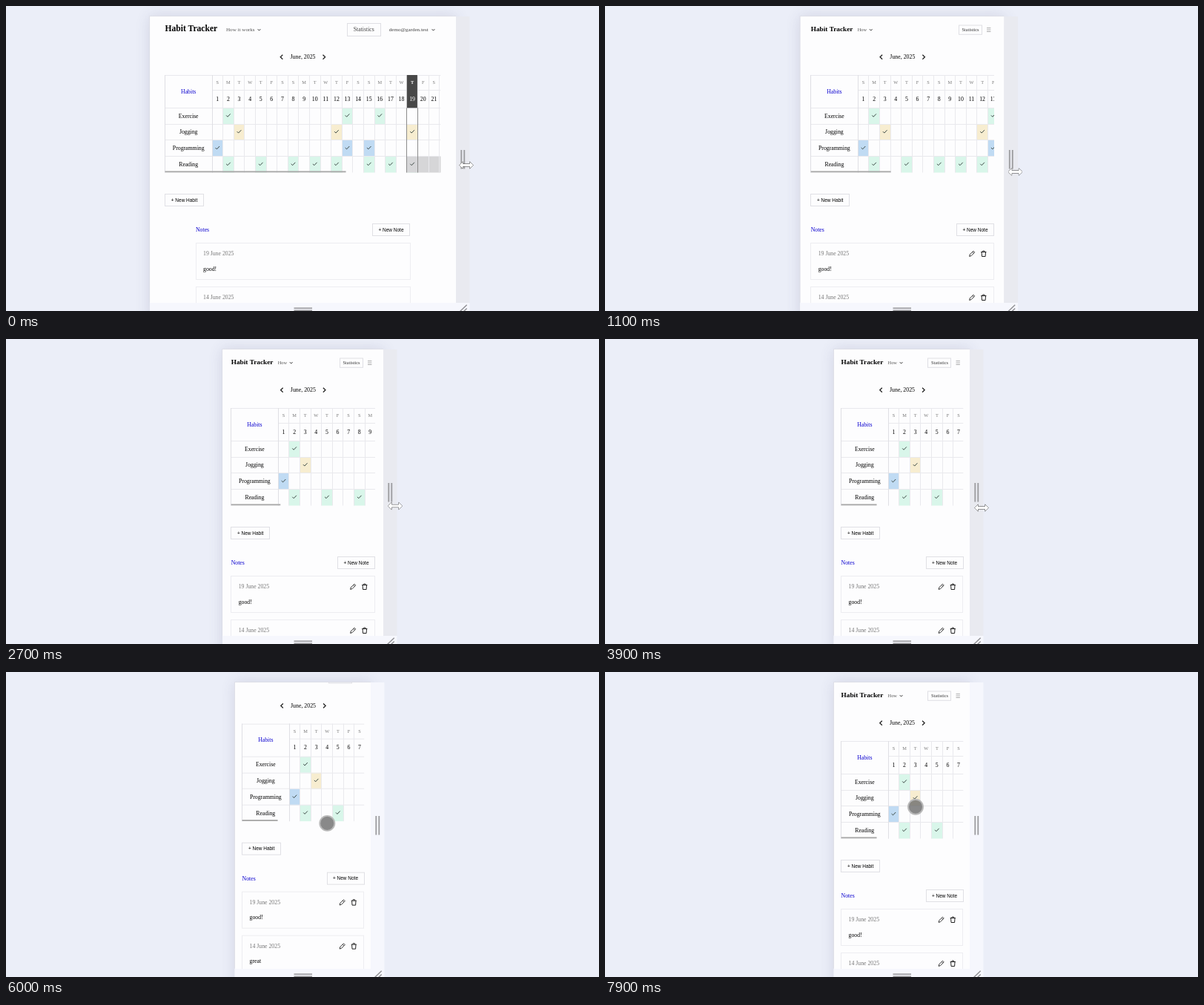
Recreate the animation shown at these times as an HTML page with a canvas. Size 800 by 411 pixels, loop 8 s.

```html
<!DOCTYPE html>
<html lang="en">
<head>
<meta charset="utf-8">
<title>Habit Tracker</title>
<style>
html, body { margin: 0; width: 100%; height: 100%; overflow: hidden; background: #ebeef8; }
canvas { display: block; width: 800px; height: 411px; }
</style>
</head>
<body>
<canvas id="stage"></canvas>
<script>
const W = 800, H = 411, LOOP = 8000, STEP = 100;
const TOP = 14, BOTTOM = 400, BAR = 18.5;
const NAME_W = 63.5, DAY_W = 14.6, ROW_Y = 137.3, ROW_H = 21.8, TABLE_W = 567;
const SERIF = '"Liberation Serif", "Times New Roman", serif';
const SANS = '"Liberation Sans", Arial, sans-serif';
const BLUE = '#0a00cf', GREY = '#777', GRID = '#e9e9ed', EDGE = '#dfdfe4';
const GREEN = '#d9f6ea', YELLOW = '#f7edd0', SKY = '#c0dbf3';

const habits = [
  { name: 'Exercise', color: GREEN, days: [2, 13, 16] },
  { name: 'Jogging', color: YELLOW, days: [3, 12, 19] },
  { name: 'Programming', color: SKY, days: [1, 13, 15] },
  { name: 'Reading', color: GREEN, days: [2, 5, 8, 10, 12, 15, 17, 19] }
];
const notes = [['19 June 2025', 'good!'], ['14 June 2025', 'great']];

// time, panel left, panel right, content left, content right
const sizeKeys = [
  [0, 194, 607, 214.5, 586.5],
  [900, 254.5, 547, 269.4, 532.6],
  [1100, 263.3, 538.5, 277.7, 525],
  [1800, 273, 528, 286.3, 515.5],
  [2700, 292, 509, 303.7, 498],
  [3600, 308, 492.8, 317.9, 484],
  [3700, 308.7, 492, 318.6, 483.5]
];
// time, x, y
const pointerKeys = [
  [0, 621, 214.5], [900, 560.5, 222.5], [1100, 553.5, 223.5], [1800, 541.5, 224],
  [2700, 525, 225], [3600, 508, 227.5], [4500, 508, 227.5], [5400, 418, 174],
  [5700, 420, 178], [6500, 455.5, 247], [6900, 455.5, 247], [7700, 419, 181.7]
];
const scrollKeys = [[5500, 0], [6100, 28], [6800, 28], [7200, 0]];

const canvas = document.getElementById('stage');
const ctx = canvas.getContext('2d');
const dpr = window.devicePixelRatio || 1;
canvas.width = W * dpr;
canvas.height = H * dpr;

function sample(keys, t) {
  let i = keys.findIndex(k => k[0] > t);
  if (i < 0) return keys[keys.length - 1].slice(1);
  if (i === 0) return keys[0].slice(1);
  const a = keys[i - 1], b = keys[i], f = (t - a[0]) / (b[0] - a[0]);
  return a.slice(1).map((v, j) => v + (b[j + 1] - v) * f);
}

function rect(x, y, w, h, color) {
  ctx.fillStyle = color;
  ctx.fillRect(x, y, w, h);
}

function vline(x, y0, y1, color) { rect(Math.round(x - 0.5), y0, 1, y1 - y0, color); }
function hline(x0, x1, y, color) { rect(x0, Math.round(y - 0.5), x1 - x0, 1, color); }

function box(x, y, w, h, color) {
  ctx.strokeStyle = color;
  ctx.lineWidth = 1;
  ctx.strokeRect(Math.floor(x) + 0.5, y, Math.round(w), h);
}

function text(str, x, y, size, color = '#000', align = 'left', family = SERIF, weight = '') {
  ctx.font = `${weight} ${size}px ${family}`;
  ctx.textAlign = align;
  ctx.fillStyle = color;
  ctx.fillText(str, x, y);
}

function path(points, color, width, closed) {
  ctx.beginPath();
  points.forEach(([x, y]) => ctx.lineTo(x, y));
  if (closed) ctx.closePath();
  ctx.strokeStyle = color;
  ctx.lineWidth = width;
  ctx.stroke();
}

function chevronDown(x, y) {
  path([[x - 1.8, y - 1], [x, y + 0.9], [x + 1.8, y - 1]], '#333', 1);
}

function chevronSide(x, y, dir) {
  path([[x - 1.6 * dir, y - 3], [x + 1.5 * dir, y], [x - 1.6 * dir, y + 3]], '#222', 1.25);
}

function check(x, y) {
  path([[x - 2.8, y], [x - 0.9, y + 1.9], [x + 2.8, y - 2]], '#3d4a46', 1);
}

function pencil(x, y) {
  path([[x - 3.6, y + 3.7], [x - 2.9, y + 1], [x + 1.8, y - 3.5], [x + 3.5, y - 1.8],
    [x - 1.1, y + 2.9]], '#222', 0.9, true);
  path([[x + 0.5, y - 2.2], [x + 2.2, y - 0.5]], '#222', 0.8);
}

function trash(x, y) {
  path([[x - 3.6, y - 2.2], [x + 3.6, y - 2.2]], '#222', 1);
  path([[x - 1.4, y - 2.4], [x - 1.1, y - 3.7], [x + 1.1, y - 3.7], [x + 1.4, y - 2.4]], '#222', 0.9);
  path([[x - 2.7, y - 2], [x - 2.3, y + 3.8], [x + 2.3, y + 3.8], [x + 2.7, y - 2]], '#222', 1);
}

function button(x, y, w, label) {
  box(x, y, w, 16, '#e0e0e5');
  text(label, x + w / 2, y + 10.3, 6.48, '#000', 'center', SANS);
}

function header(l, r, wide) {
  text('Habit Tracker', l, 34.4, wide ? 11.55 : 9.28, '#000', 'left', SERIF, 'bold');
  if (wide) {
    text('How it works', l + 82.5, 34.4, 7.1, '#555');
    chevronDown(l + 127, 32.2);
    box(r - 126, 23.5, 44.5, 17, EDGE);
    text('Statistics', r - 103.7, 34.4, 7.75, '#444', 'center');
    text('demo@garden.test', r - 69.7, 34.4, 7.05, '#444');
    chevronDown(r - 10, 32.2);
  } else {
    text('How', l + 63, 34, 6.35, '#555');
    chevronDown(l + 81, 32.2);
    box(r - 47.6, 26, 31, 12.3, EDGE);
    text('Statistics', r - 32, 34, 6.35, '#333', 'center');
    [29.7, 32.1, 34.5].forEach(y => rect(r - 10, y - 0.4, 5.4, 0.8, '#999'));
  }
}

function table(l, r) {
  const end = ROW_Y + ROW_H * 4, x0 = l + NAME_W;
  ctx.save();
  ctx.beginPath();
  ctx.rect(l - 1, 90, r - l + 1, 140);
  ctx.clip();
  const dayX = d => x0 + (d - 1) * DAY_W;

  habits.forEach((habit, i) => {
    const y = ROW_Y + i * ROW_H;
    habit.days.forEach(d => rect(dayX(d), y, DAY_W, ROW_H, habit.color));
  });
  rect(dayX(19), end - ROW_H, DAY_W * 12, ROW_H, '#d6d6d8');

  [93, 113, ROW_Y].forEach(y => hline(x0, r, y, GRID));
  for (let i = 1; i < 4; i++) hline(l, r, ROW_Y + i * ROW_H, GRID);
  for (let d = 1; d <= 31; d++) vline(dayX(d), 93, end, GRID);
  hline(l, x0, 93, GRID);
  hline(l, x0, ROW_Y, GRID);
  vline(l, 93, end, EDGE);
  vline(x0, 93, end, EDGE);

  rect(dayX(19), 93, DAY_W - 0.5, ROW_Y - 93, '#484848');
  vline(dayX(19), ROW_Y, end, '#8c8c8c');
  vline(dayX(20), ROW_Y, end, '#8c8c8c');

  for (let d = 1; d <= 30; d++) {
    const x = dayX(d) + DAY_W / 2, today = d === 19;
    text('SMTWTFS'[(d - 1) % 7], x, 105.1, 6.3, today ? '#fff' : GREY, 'center', SERIF, today ? 'bold' : '');
    text(d, x, 127.8, 7.78, today ? '#fff' : '#000', 'center');
  }
  text('Habits', l + 31.7, 117.7, 7.78, BLUE, 'center');
  habits.forEach((habit, i) => {
    const y = ROW_Y + (i + 0.5) * ROW_H;
    text(habit.name, l + 31.7, y + 2.4, 7.78, '#000', 'center');
    habit.days.forEach(d => check(dayX(d) + DAY_W / 2, y - 0.8));
  });
  rect(l, 222.4, (r - l) ** 2 / TABLE_W, 1.9, '#aaa');
  ctx.restore();
}

function noteList(l, r, wide) {
  text('Notes', l, 304.4, 7.78, BLUE);
  button(r - 50.5, 293.5, 50, '+ New Note');
  notes.forEach(([date, body], i) => {
    const y = 319.5 + i * 59;
    box(l, y, r - l - 0.5, 49, '#ededf1');
    text(date, l + 10, y + 16.6, 7.78, GREY);
    text(body, l + 10, y + 37, 7.78);
    if (!wide) {
      pencil(r - 29.8, y + 14.2);
      trash(r - 14.2, y + 14.2);
    }
  });
}

function page(l, r, width, scroll) {
  const wide = width > 373, mid = (l + r) / 2;
  ctx.translate(0, -scroll);
  header(l, r, wide);
  text('June, 2025', mid, 71.3, 7.85, '#000', 'center');
  chevronSide(mid - 28.8, 68.8, -1);
  chevronSide(mid + 28.6, 68.8, 1);
  table(l, r);
  button(l, 253.5, 52, '+ New Habit');
  const half = Math.min(r - l, 289) / 2;
  noteList(mid - half, mid + half, wide);
}

function frame(left, right, hover) {
  const outer = right + BAR;
  ctx.save();
  ctx.shadowColor = 'rgba(70, 70, 110, 0.16)';
  ctx.shadowBlur = 18 * dpr;
  rect(left, TOP, right - left, H, '#fdfdfe');
  ctx.restore();
  rect(left - 0.5, TOP - 0.7, right - left + 0.5, 0.8, '#dedfe6');
  rect(left - 0.7, TOP - 0.5, 0.8, BOTTOM - TOP, '#dcdde5');
  rect(right, TOP, BAR, BOTTOM - TOP, hover ? '#e9eaf0' : '#f6f7fd');
  rect(left, BOTTOM, outer - left, H - BOTTOM, '#f6f7fd');
  [6.4, 10.4].forEach(dx => rect(right + dx, 194, 1.8, 25.5, '#9c9c9f'));
  [406.4, 409.4].forEach(y => rect(388.5, y, 24.5, 1.6, '#9c9c9f'));
  path([[right + 5.5, 411.5], [right + 14.7, 402.8]], '#8e8e92', 1.4);
  path([[right + 10.5, 411.5], [right + 14.7, 407.4]], '#8e8e92', 1.4);
}

function resizeArrow(x, y) {
  const half = [[-9.5, 0], [-4.8, -4.6], [-4.8, -1.6], [4.8, -1.6], [4.8, -4.6], [9.5, 0]];
  const under = half.slice(1, 5).reverse().map(([a, b]) => [a, -b]);
  const points = half.concat(under).map(([a, b]) => [x + a, y + b]);
  path(points, '#555', 1, true);
  ctx.fillStyle = '#fff';
  ctx.fill();
}

function touch(x, y) {
  ctx.beginPath();
  ctx.arc(x, y, 10, 0, Math.PI * 2);
  ctx.fillStyle = 'rgba(108, 108, 108, 0.8)';
  ctx.fill();
  ctx.strokeStyle = '#b9b9b9';
  ctx.lineWidth = 1.9;
  ctx.stroke();
}

function draw(t) {
  const [left, right, l, r] = sample(sizeKeys, t);
  const [px, py] = sample(pointerKeys, t);
  const [scroll] = sample(scrollKeys, t);
  const hover = px > right;

  ctx.setTransform(dpr, 0, 0, dpr, 0, 0);
  rect(0, 0, W, H, '#ebeef8');
  frame(left, right, hover);
  ctx.save();
  ctx.beginPath();
  ctx.rect(left, TOP, right - left, BOTTOM - TOP);
  ctx.clip();
  page(l, r, right - left, scroll);
  ctx.restore();
  if (hover) resizeArrow(px, py);
  else touch(px, py);
}

const start = performance.now();
function tick() {
  const t = (performance.now() - start) % LOOP;
  draw(Math.floor(t / STEP) * STEP);
  requestAnimationFrame(tick);
}
tick();
</script>
</body>
</html>
```
